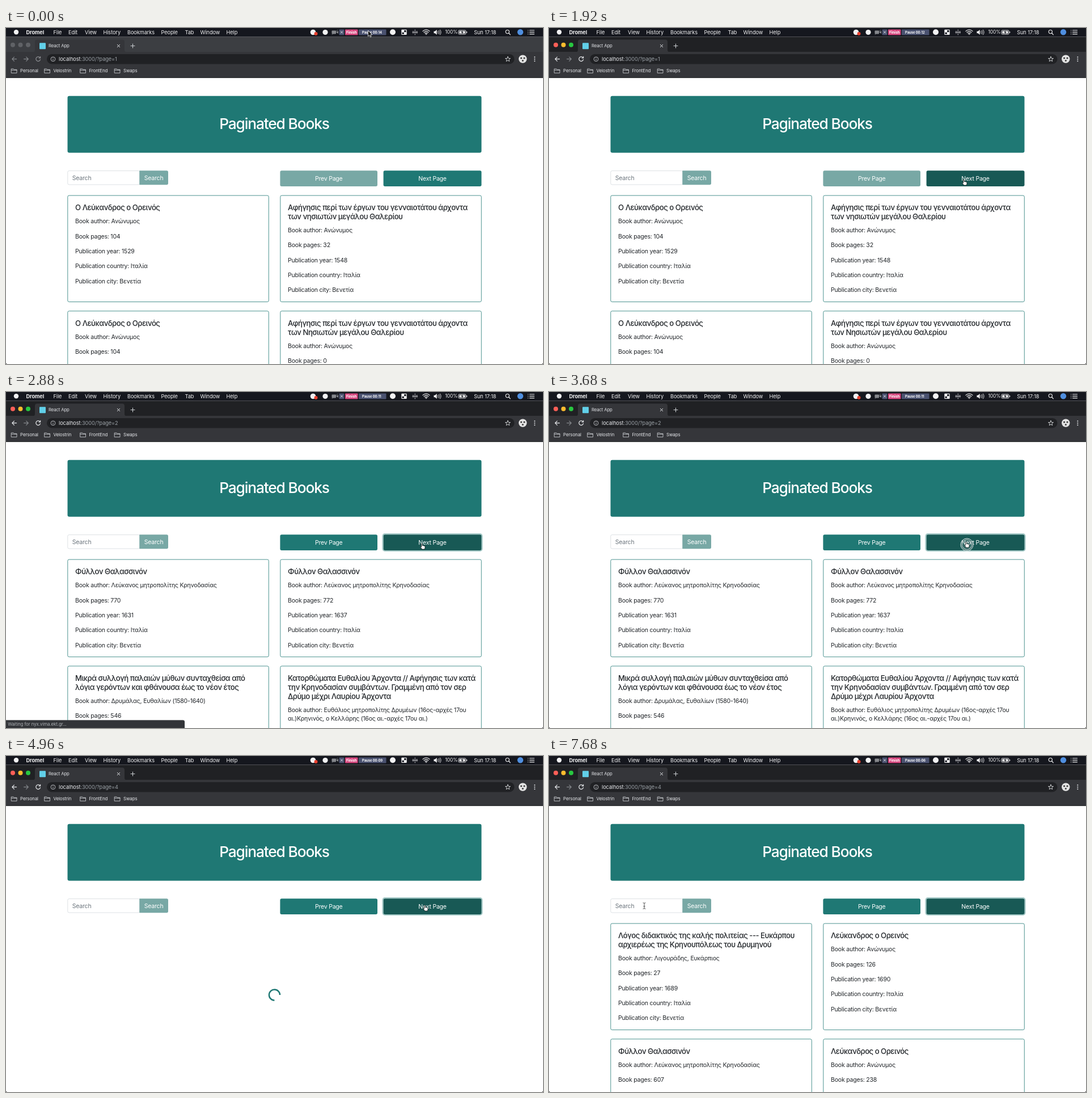
An HTML page for the animation above (8 s loop, 947 px wide and 592 px high).

```html
<!DOCTYPE html>
<html lang="en">
<head>
<meta charset="utf-8">
<title>Paginated Books</title>
<style>
html, body { margin: 0; width: 100%; height: 100%; overflow: hidden; background: #fff; }
svg { display: block; width: 947px; height: 592px; }
text { font-family: Inter, Roboto, "Noto Sans", sans-serif; letter-spacing: -.02em; font-optical-sizing: none; white-space: pre; }
.ui { letter-spacing: -.01em; }
.h5 { letter-spacing: -.038em; font-weight: 540; }
.h1 { letter-spacing: -.043em; font-weight: 530; }
.line { fill: none; stroke-linecap: round; stroke-linejoin: round; }
</style>
</head>
<body>
<svg id="stage" viewBox="0 0 947 592"></svg>
<script>
const LOOP = 8000;
const TEAL = '#1f7874', DARK = '#185955', PALE = '#78a8a5', INK = '#212529';
const stage = document.getElementById('stage');
const $ = id => document.getElementById(id);

// --- drawing helpers: text is placed by the middle of its capitals
const text = (x, cy, str, size, fill, more = '') =>
  `<text x="${x}" y="${(cy + size * .364).toFixed(2)}" font-size="${size}" fill="${fill}" ${more}>${str}</text>`;
const rect = (x, y, w, h, fill, r = 0, more = '') =>
  `<rect x="${x}" y="${y}" width="${w}" height="${h}" rx="${r}" fill="${fill}" ${more}/>`;
const dot = (x, y, r, fill, more = '') => `<circle cx="${x}" cy="${y}" r="${r}" fill="${fill}" ${more}/>`;
const line = (d, color, w = 1, more = '') => `<path class="line" d="${d}" stroke="${color}" stroke-width="${w}" ${more}/>`;
const shape = (d, fill, more = '') => `<path d="${d}" fill="${fill}" ${more}/>`;

// --- menu bar
function menuBar() {
  const items = [[83.5, 'File'], [110, 'Edit'], [139, 'View'], [171.5, 'History'], [214, 'Bookmarks'],
    [273.5, 'People'], [315.5, 'Tab'], [342.5, 'Window'], [388.5, 'Help']];
  const W = '#f2f2f3';
  let s = rect(0, 0, 947, 15.5, '#15171e') + dot(18, 7.2, 4.2, W);
  s += text(35.5, 7.2, 'Dromel', 9.2, W, 'class="ui" font-weight="700"');
  for (const [x, label] of items) s += text(x, 7.2, label, 9.2, W, 'class="ui"');
  s += dot(541.5, 7.5, 4.8, W) + dot(546.5, 10, 3, '#e8402f') + dot(563, 7.5, 4.6, W);
  s += rect(574.5, 4.5, 7.5, 6, '#85878c', 1) + shape('M582 7.5l4-2.6v5.2z', '#85878c') + line('M575 11.5L585 3.5', '#85878c', .8);
  s += rect(587.5, 2.5, 9, 10, '#4a5270', 1) + line('M590.3 5.8l3.4 3.4m0-3.4l-3.4 3.4', '#fff', .8);
  s += rect(598, 2.5, 22.5, 10, '#d8477f', 1) + text(609.2, 7.5, 'Finish', 6.6, '#fff', 'font-weight="700" text-anchor="middle"');
  s += rect(622, 2.5, 48.5, 10, '#4a5270', 1);
  s += text(628, 7.5, '', 5.9, '#fff', 'id="clock" class="ui" font-weight="700"');
  s += dot(682, 7.3, 5, W);
  s += rect(697.3, 2.7, 9.4, 9.2, W, 1) + rect(702.2, 3.9, 3.3, 3.3, '#15171e') + rect(698.5, 7.8, 3.3, 3, '#15171e');
  s += line('M721.3 3v9M718 5.3v4.4M724.6 5.3v4.4M716.8 7.5h9', '#b9babd', 1);
  s += line('M735 5.7a8.4 8.4 0 0 1 12 0M737 7.8a5.6 5.6 0 0 1 8 0M739 9.8a2.8 2.8 0 0 1 4 0', W, 1.2) + dot(741, 11.2, .9, W);
  s += shape('M754.5 5.7h2.2l3-2.7v9l-3-2.7h-2.2z', W) + line('M761.5 5.6a3 3 0 0 1 0 3.8M763.5 4.3a5 5 0 0 1 0 6.4M765.5 3.2a7 7 0 0 1 0 8.6', W, .9);
  s += text(774.5, 7.2, '100%', 8.4, W, 'class="ui"');
  s += rect(798, 4, 13, 7, 'none', 1.4, `stroke="${W}" stroke-width=".9"`) + rect(799.4, 5.4, 10.2, 4.2, W) +
    shape('M812 6.2h1.2v2.6h-1.2z', W) + shape('M805.5 4l-3 4h2l-.8 3 3-4h-2z', '#15171e');
  s += text(825.2, 7.2, 'Sun 17:18', 9.2, W, 'class="ui"');
  s += dot(884.3, 6.6, 3.1, 'none', `stroke="${W}" stroke-width="1.1"`) + line('M886.7 9l2.6 2.8', W, 1.2);
  s += dot(907, 7.3, 5.2, '#4f8fe0');
  return s + line('M923.5 4h8M923.5 7.3h8M923.5 10.6h8', W, 1.2) + line('M920.6 4h.2M920.6 7.3h.2M920.6 10.6h.2', W, 1.2);
}

// --- browser window frame
function browser() {
  const W = '#e8eaed', G = '#85888c';
  let s = rect(0, 15.5, 947, 27, '#202124', 0, 'id="strip"');
  s += [12, 25.5, 39].map((x, i) => dot(x, 29.7, 4, '#000', `id="light${i}"`)).join('');
  s += shape('M47 42.5q4 0 4-4V24.5q0-4 4-4H205q4 0 4 4V38.5q0 4 4 4z', '#35363a');
  s += rect(0, 42, 947, 46, '#35363a') + rect(0, 87.2, 947, .9, '#1d1e20');
  s += rect(59, 26.2, 11, 11, '#61cfe8', 1) + text(75, 31.6, 'React App', 7.8, '#dfe1e5');
  s += line('M196.3 29.3l4.4 4.4m0-4.4l-4.4 4.4', W, 1) + line('M220 31.5h7M223.5 28v7', '#c9ccd0', 1.1);
  s += line('M18.5 54.7h-7.6m3.5-3.6l-3.6 3.6 3.6 3.6', W, 1.2, 'id="back"');
  s += line('M31.6 54.7h7.6m-3.5-3.6l3.6 3.6-3.6 3.6', G, 1.2);
  s += `<g id="reload">${line('M59.8 52.2a3.9 3.9 0 1 0 .7 3.4M60.6 50.4v2.6h-2.6', W, 1.2)}</g>`;
  s += rect(72, 46, 824.5, 17.4, '#202124', 8.7);
  s += dot(83, 54.8, 3.9, 'none', 'stroke="#c4c7cb" stroke-width=".9"') + line('M83 54.6v2M83 52.8v.1', '#c4c7cb', .9);
  s += `<text class="ui" x="93" y="58" font-size="9.2" fill="${W}">localhost<tspan id="query" fill="#9aa0a6"></tspan></text>`;
  let star = '';
  for (let i = 0; i < 10; i++) {
    const a = i * Math.PI / 5, r = i % 2 ? 2 : 4.7;
    star += `${i ? 'L' : 'M'}${(885 + r * Math.sin(a)).toFixed(2)} ${(55 - r * Math.cos(a)).toFixed(2)}`;
  }
  s += line(star + 'z', '#d5d7da', .9);
  s += dot(911.3, 54.6, 7.2, '#e4e4e4') + dot(908.6, 53, 1.6, '#3a3a3a') + dot(914, 53, 1.6, '#3a3a3a') + dot(911.3, 57.6, 1.5, '#3a3a3a');
  s += [51.2, 54.7, 58.2].map(y => dot(932.3, y, 1, W)).join('');
  for (const [x, label] of [[9, 'Personal'], [67.5, 'Velostrin'], [130.5, 'FrontEnd'], [191, 'Swaps']]) {
    s += line(`M${x + .6} 72h3.6l1.2 1.3h4.6v6H${x + .6}zM${x + .6} 74.3h9.4`, '#c4c7cb', .9);
    s += text(x + 16, 75.6, label, 7.9, W, 'class="ui"');
  }
  return s;
}

// --- page content
const button = (id, x, w, label) =>
  rect(x, 251.2, w, 27.7, TEAL, 2.7, `id="${id}"`) + text(x + w / 2, 265.4, label, 10.52, '#fff', 'text-anchor="middle"');

function header() {
  return rect(108.5, 119.8, 730, 99.9, TEAL, 3.2) + text(473, 168, 'Paginated Books', 26.3, '#fff', 'class="h1" text-anchor="middle"') +
    rect(108.8, 251.6, 127, 24.4, '#fff', 2.4, 'stroke="#ced4da" stroke-width=".7"') + text(116.8, 264, 'Search', 10.52, '#6c757d') +
    shape('M235.3 251.3h48q2.7 0 2.7 2.7v19.6q0 2.7-2.7 2.7h-48z', PALE) + text(260.6, 264, 'Search', 10.52, '#fff', 'text-anchor="middle"') +
    rect(664.5, 250.2, 175, 29.7, 'none', 3.6, 'id="focus" stroke="#a5c9c7" stroke-width="2.2"') +
    button('prev', 483.4, 171.6, 'Prev Page') + button('next', 665.6, 172.9, 'Next Page');
}

const ANON = 'Ανώνυμος', BISHOP = 'Λεύκανος μητροπολίτης Κρηνοδασίας', ITALY = ['Ιταλία', 'Βενετία'];
const SHEET = 'Φύλλον Θαλασσινόν', TALE = 'Αφήγησις περί των έργων του γενναιοτάτου άρχοντα|των ';
// title, author ('|' breaks the line), pages, year, [country, city]
const PAGES = [
  [['Ο Λεύκανδρος ο Ορεινός', ANON, 104, 1529, ITALY], [TALE + 'νησιωτών μεγάλου Θαλερίου', ANON, 32, 1548, ITALY],
    ['Ο Λεύκανδρος ο Ορεινός', ANON, 104, 1553, ITALY], [TALE + 'Νησιωτών μεγάλου Θαλερίου', ANON, 0, 1554, ITALY]],
  [[SHEET, BISHOP, 770, 1631, ITALY], [SHEET, BISHOP, 772, 1637, ITALY],
    ['Μικρά συλλογή παλαιών μύθων συνταχθείσα από|λόγια γερόντων και φθάνουσα έως το νέον έτος', 'Δρυμάλας, Ευθαλίων (1580-1640)', 546, 1637, ITALY],
    ['Κατορθώματα Ευθαλίου Άρχοντα // Αφήγησις των κατά|την Κρηνοδασίαν συμβάντων. Γραμμένη από τον σερ|Δρύμο μέχρι Λαυρίου Άρχοντα',
      'Ευθάλιος μητροπολίτης Δρυμέων (16ος-αρχές 17ου|αι.)Κρηνινός, ο Κελλάρης (16ος αι.-αρχές 17ου αι.)', 0, 1638, ITALY]],
  [['De vita antiquorum Montanorum', 'Κέδριος, Λεοντόφιλος (†1638)', 1104, 1676, ['Γερμανία', 'Λειψία']], ['Ο Νυκτοδρόμος', BISHOP, 598, 1676, ITALY],
    [SHEET, BISHOP, 594, 1676, ITALY],
    ['Αφήγησις διά λόγων απλών του μεγάλου χειμώνος του|εν τη νήσω Δρύμη', 'Κεδρινούσης, Εύκαρπος-Λεύκιος ιερομόναχος', 0, 1681, ITALY]],
  [['Λόγος διδακτικός της καλής πολιτείας --- Ευκάρπου|αρχιερέως της Κρηνουπόλεως του Δρυμηνού', 'Λιγουράδης, Ευκάρπιος', 27, 1689, ITALY],
    ['Λεύκανδρος ο Ορεινός', ANON, 126, 1690, ITALY], [SHEET, BISHOP, 607, 1691, ITALY], ['Λεύκανδρος ο Ορεινός', ANON, 238, 1699, ITALY]]
];
const LINE = 15.78, GAP = 10.52;

function card(x, y, h, [title, author, pages, year, [country, city]]) {
  let s = rect(x + .4, y, 354.5, h, '#fff', 2.5, `stroke="${TEAL}" stroke-width=".8"`);
  let cy = y + 21.5;
  for (const row of title.split('|')) {
    s += text(x + 13.7, cy, row, 13.15, INK, 'class="h5"');
    cy += LINE;
  }
  cy += 8.1;
  for (const para of ['Book author: ' + author, 'Book pages: ' + pages, 'Publication year: ' + year,
    'Publication country: ' + country, 'Publication city: ' + city]) {
    for (const row of para.split('|')) {
      s += text(x + 13.7, cy, row, 10.52, INK);
      cy += LINE;
    }
    cy += GAP;
  }
  return s;
}

function bookPage(books, i) {
  const tall = books.slice(0, 2).some(b => b[0].includes('|'));
  const h = tall ? 187.4 : 171.6;
  const cards = books.map((b, k) => card(k % 2 ? 483.4 : 108.4, k < 2 ? 295.1 : 295.1 + h + 16.2, k < 2 ? h : 200, b));
  return `<g id="page${i + 1}">${cards.join('')}</g>`;
}

function overlays() {
  const edge = 'stroke="#000" stroke-width=".7" stroke-linejoin="round"';
  return `<path id="spin" class="line" style="stroke-linecap:butt" d="M7.1 7.1A10.04 10.04 0 1 1 7.1 -7.1" stroke="${TEAL}" stroke-width="2.6" />` +
    `<g id="bubble">${shape('M0 577.5h312q3.5 0 3.5 3.5v11H0z', '#000', 'opacity=".15"')}${shape('M0 578.2h312q3 0 3 3V592H0z', '#323438')}` +
    text(3.2, 585.5, 'Waiting for nyx.vima.ekt.gr...', 7.9, '#aeb1b5', 'class="ui"') + '</g>' +
    shape('M0 589.5V592h2.5A2.5 2.5 0 0 1 0 589.5zM947 589.5V592h-2.5a2.5 2.5 0 0 0 2.5-2.5z', '#000') +
    `<g id="cursor"><g id="arrow">${shape('M-2.5 -5.5v10.2l2.4-2.2 1.6 3.6 1.6-.7-1.6-3.5h3.3z', '#000', 'stroke="#fff" stroke-width=".8"')}</g>` +
    `<g id="hand">${shape('M-2.4 -4.4q.9-1 1.7 0v3.2q.9-.7 1.6.1 1-.5 1.6.3 1.2-.3 1.5.8 .3 2.6-.8 5H-1.5Q-2.6 3-4 1.2q.2-1.3 1.6-.2z', '#fff', edge)}</g>` +
    `<g id="beam">${line('M-2 -5.3q1.6 0 2 1 .4-1 2-1M0 -4.3v8.6M-2 5.3q1.6 0 2-1 .4 1 2 1M-1.2 .9h2.4', '#222', .75)}</g>` +
    `<g id="ring">${dot(0, 0, 11, '#fff', 'fill-opacity=".1" stroke="#dfe6e6" stroke-width="1"')}${dot(0, 0, 8.6, 'none', 'stroke="#9fb3b2" stroke-width="1.3"')}</g></g>`;
}

stage.innerHTML = rect(0, 0, 947, 592, '#fff') + header() + PAGES.map(bookPage).join('') + browser() + menuBar() + overlays();

// --- motion
const within = (t, spans) => spans.some(([a, b]) => t >= a && t < b);
const show = (id, on) => $(id).setAttribute('display', on ? 'inline' : 'none');
const fill = (id, color) => $(id).setAttribute('fill', color);
const mix = (a, b, p) => a + (b - a) * p;

const ACTIVE = 1440, FOCUS = 2080;
const TURNS = [2240, 3840, 4720];
const LOADS = [[2240, 2880], [3840, 3960], [4720, 5360]];
const CLICKS = [[1280, 1440], [2020, 2240], [3520, 3840], [4480, 4720]];
const BUBBLES = [[2400, 3000], [3900, 4120]];
const DRIFT = [[160, 641, 10], [1120, 733, 272], [1920, 733, 272], [2240, 735, 272], [3360, 735, 272], [3680, 737, 269], [4000, 738, 269], [4960, 740, 268]];
const LEAVE = 5440, ARRIVE = 7040;

function pointer(t) {
  if (t >= LEAVE) {
    const u = Math.min(1, (t - LEAVE) / (ARRIVE - LEAVE)), p = 1 - (1 - u) ** 2, q = 1 - p;
    return [q * q * 740 + 2 * p * q * 450 + p * p * 168, q * q * 268 + 2 * p * q * 534 + p * p * 264];
  }
  let a = DRIFT[0];
  for (const b of DRIFT) {
    if (t < b[0]) {
      const u = Math.max(0, (t - a[0]) / (b[0] - a[0] || 1)), p = u * u * (3 - 2 * u);
      return [mix(a[1], b[1], p), mix(a[2], b[2], p)];
    }
    a = b;
  }
  return [a[1], a[2]];
}

function render(t) {
  const active = t >= ACTIVE, loading = within(t, LOADS);
  const page = 1 + TURNS.filter(s => t >= s).length;
  $('clock').textContent = 'Pause 00:' + String(14 - Math.floor(t / 960)).padStart(2, '0');
  $('query').textContent = ':3000/?page=' + page;

  fill('strip', active ? '#202124' : '#3c3e42');
  ['#fe5f57', '#febc2e', '#28c840'].forEach((c, i) => fill('light' + i, active ? c : '#606266'));
  $('back').setAttribute('stroke', active ? '#e8eaed' : '#85888c');
  $('reload').setAttribute('opacity', active ? 1 : .5);

  fill('prev', page > 1 ? TEAL : PALE);
  fill('next', active ? DARK : TEAL);
  show('focus', t >= FOCUS);
  PAGES.forEach((_, i) => show('page' + (i + 1), !loading && page === i + 1));
  show('bubble', within(t, BUBBLES));

  show('spin', loading);
  const turn = ((t - (page > 2 ? 4330 : 1930)) / 720 + 10) % 1;
  const scale = .8 + .4 * Math.abs(turn - .5);
  $('spin').setAttribute('transform', `translate(473.5 421) rotate(${90 + turn * 360}) scale(${scale})`);

  const [x, y] = pointer(t);
  const onNext = active && x > 665 && y > 250 && y < 280;
  const onSearch = x > 108 && x < 235 && y > 250 && y < 277;
  $('cursor').setAttribute('transform', `translate(${x.toFixed(2)} ${y.toFixed(2)})`);
  show('hand', onNext);
  show('beam', onSearch);
  show('arrow', !onNext && !onSearch);
  show('ring', within(t, CLICKS));
}

const start = performance.now();
function tick() {
  render((performance.now() - start) % LOOP);
  requestAnimationFrame(tick);
}
render(0);
requestAnimationFrame(tick);
</script>
</body>
</html>
```
